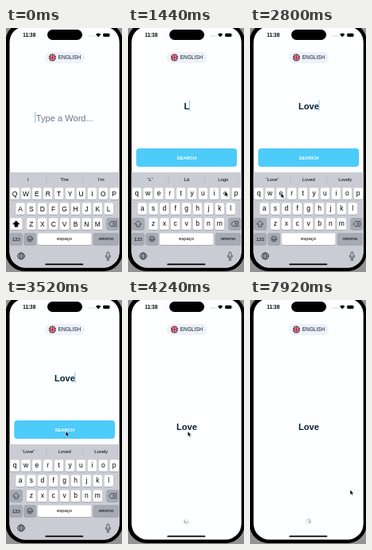
An HTML page that plays this animation: 146x306 px, repeating every 8 s.

```html
<!DOCTYPE html>
<html lang="en">
<head>
<meta charset="utf-8">
<title>Word search</title>
<style>
  html, body { margin: 0; width: 100%; height: 100%; overflow: hidden; background: #939394; }
  svg { display: block; width: 146px; height: 306px; }
  text { font-family: "Liberation Sans", Arial, sans-serif; text-anchor: middle; fill: #000; }
  .word { font-size: 11.1px; font-weight: 700; fill: #03202f; }
  .hint { font-size: 11.1px; fill: #6c7782; }
  .small { font-size: 5.9px; }
  .letter { font-size: 8.5px; }
  .line { fill: none; stroke: #24272c; stroke-width: .7; stroke-linecap: round; stroke-linejoin: round; }
</style>
</head>
<body>
<svg viewBox="0 0 146 306">
  <defs>
    <clipPath id="screen"><rect x="4.5" y="-2" width="138.2" height="302.4" rx="19.8"/></clipPath>
    <clipPath id="disc"><circle cx="58.4" cy="37" r="4.5"/></clipPath>
  </defs>
  <rect x="-.6" y="-7" width="147.4" height="312" rx="24" fill="#000"/>
  <g clip-path="url(#screen)">
    <rect width="146" height="306" fill="#fdfeff"/>

    <text x="29.2" y="11.2" font-size="6.4" font-weight="700">11:38</text>
    <rect x="52" y="2" width="44" height="13" rx="6.5" fill="#000"/>
    <g fill="#a9abae">
      <circle cx="104.5" cy="10" r=".6"/><circle cx="106.6" cy="10" r=".6"/>
      <circle cx="108.7" cy="10" r=".6"/><circle cx="110.8" cy="10" r=".6"/>
    </g>
    <path d="M113 8.1Q116.2 4.9 119.4 8.1L116.2 11.4Z" fill="#000"/>
    <rect x="122.2" y="6.7" width="8.2" height="4.4" rx="1.3" fill="#000"/>
    <rect x="130.7" y="8.1" width=".6" height="1.6" fill="#777"/>

    <rect x="48.7" y="30" width="50.6" height="14.2" rx="7.1" fill="#eef2f8"/>
    <g clip-path="url(#disc)" fill="none">
      <rect x="53" y="32" width="11" height="10" fill="#141a42"/>
      <path d="M53 32L63.8 42M63.8 32L53 42" stroke="#e8e8ee" stroke-width="1.1"/>
      <path d="M53 32L63.8 42M63.8 32L53 42" stroke="#b81c2b" stroke-width=".6"/>
      <path d="M58.4 32V42M53 37H64" stroke="#fff" stroke-width="2.2"/>
      <path d="M58.4 32V42M53 37H64" stroke="#c81d2d" stroke-width="1.4"/>
    </g>
    <text x="80" y="39.3" font-size="6.5" style="fill:#0b1d30">ENGLISH</text>

    <text id="word" x="73.9" class="word"></text>
    <text id="hint" x="73.8" y="116.6" class="hint">Type a Word...</text>
    <rect id="caret" width=".9" height="13.5" fill="#7ab5e2"/>

    <g id="button">
      <rect x="10.3" y="151" width="126.8" height="23" rx="4" fill="#4dcbf9"/>
      <text x="73.9" y="164.7" class="small" font-weight="700" style="fill:#fff">SEARCH</text>
    </g>
    <g id="spinner"></g>
    <g id="keyboard"></g>
    <rect x="49.3" y="295.6" width="48" height="1.7" rx=".85" fill="#000"/>
  </g>
  <path id="pointer" d="M0 0V6.2L1.5 4.9L2.5 7.1L3.6 6.6L2.7 4.5H4.6Z" fill="#000" stroke="#fff" stroke-width=".5"/>
</svg>

<script>
const LOOP = 8000, STEP = 80;
const $ = id => document.getElementById(id);
const show = (el, on) => el.setAttribute('visibility', on ? 'visible' : 'hidden');
const move = (el, x, y) => el.setAttribute('transform', `translate(${x} ${y})`);
const clamp = v => Math.max(0, Math.min(1, v));

// Keyboard geometry
const ROWS = ['qwertyuiop', 'asdfghjkl', 'zxcvbnm'];
const PITCH = 13.9, KEY_W = 11.6, KEY_H = 14.9;
const rowTop = r => 200.2 + r * 19;
const GREY = '#a5aab4', WHITE = '#fff';

const label = (x, y, s, cls) => `<text x="${x}" y="${y}" class="${cls}">${s}</text>`;
const box = (x, y, w, fill) =>
  `<rect x="${x}" y="${y + .4}" width="${w}" height="${KEY_H}" rx="1.8" fill="#888b90"/>` +
  `<rect x="${x}" y="${y}" width="${w}" height="${KEY_H}" rx="1.8" fill="${fill}"/>`;
const icon = (d, more = '') => `<path class="line" d="${d}" ${more}/>`;

const keys = {};
ROWS.forEach((row, r) => [...row].forEach((ch, i) => {
  keys[ch] = { x: 73.6 + (i - (row.length - 1) / 2) * PITCH, y: rowTop(r) };
}));

function letters(upper) {
  return Object.entries(keys).map(([ch, k]) =>
    box(k.x - KEY_W / 2, k.y, KEY_W, WHITE) +
    label(k.x, k.y + (upper ? 10.4 : 9.8), upper ? ch.toUpperCase() : ch, 'letter')).join('');
}

function specials(upper) {
  const y = rowTop(2), b = rowTop(3);
  return box(5.3, y, 15.2, upper ? WHITE : GREY) +
    icon(`M12.9 ${y + 3.8}l4 4h-2.1v3.2h-3.8v-3.2h-2.1z`, upper ? 'style="fill:#000;stroke:#000"' : '') +
    box(126.6, y, 15.2, GREY) +
    icon(`M130 ${y + 7.4}l2.7-3h6v6h-6zM134.5 ${y + 6.1}l2.4 2.6m0-2.6l-2.4 2.6`) +
    box(5.3, b, 15.2, GREY) + label(12.8, b + 9.5, '123', 'small') +
    box(22.6, b, 15.2, GREY) +
    `<circle class="line" cx="30.2" cy="${b + 7.3}" r="3.4"/>` +
    icon(`M28.3 ${b + 8.2}q1.9 2.3 3.8 0zM28.9 ${b + 6.1}v.2m2.6-.2v.2`) +
    box(39.9, b, 67.6, WHITE) + label(73.6, b + 9.2, 'espaço', 'small') +
    box(109.8, b, 32, GREY) + label(125.9, b + 9.2, 'retorno', 'small') +
    `<circle class="line" cx="19.1" cy="286" r="4.3"/><ellipse class="line" cx="19.1" cy="286" rx="1.9" ry="4.3"/>` +
    icon('M14.8 286h8.6M15.6 283.6h7M15.6 288.4h7') +
    `<rect class="line" x="126.8" y="281" width="3.2" height="6.2" rx="1.6"/>` +
    icon('M125.2 285.4q0 3.6 3.2 3.6t3.2-3.6M128.4 289v2M126.8 291h3.2');
}

const plate = '<rect x="0" y="181" width="146" height="126" fill="#c9ccd3"/>';
$('keyboard').innerHTML = plate + '<g id="bar"></g>' +
  [true, false].map(u => `<g id="${u ? 'upper' : 'lower'}">${letters(u)}${specials(u)}</g>`).join('') +
  '<g id="bubble"></g>';

function bubble(ch, upper) {
  if (!ch) return '';
  const { x, y } = keys[ch], h = KEY_W / 2, w = 10.4;
  return `<path fill="#fff" stroke="#b4b7bc" stroke-width=".3" d="M${x - w} ${y - 20}q0-3.4 3.4-3.4h${2 * w - 6.8}q3.4 0 3.4 3.4v12.4` +
    `q0 3-2.4 4.8q-2.2 1.6-2.2 4.2V${y + 13}q0 1.9-1.9 1.9H${x - h + 1.9}q-1.9 0-1.9-1.9V${y + 1.4}q0-2.6-2.2-4.2q-2.4-1.8-2.4-4.8z"/>` +
    `<text x="${x}" y="${y - 7.8}" font-size="13.2">${upper ? ch.toUpperCase() : ch}</text>`;
}

// Start time, typed word, three suggestions, highlighted middle
const GUESS = ['“Lo”', 'Li', 'Love'];
const TYPED = [
  [-400, '', ['I', 'The', "I'm"]],
  [1040, 'L', ['“L”', 'Lá', 'Logo']],
  [1600, 'Lo', GUESS, true],
  [2240, 'Lov', GUESS, true],
  [2720, 'Love', ['“Love”', 'Loved', 'Lovely']]
];
const PRESSES = [['l', 880, 1040], ['o', 1520, 1680], ['v', 2160, 2320], ['e', 2640, 2800]];
const PRESS = 3680, SEND = 3760, SLIDE = 320;

// Time, x, y of the pointer tip
const PATH = [
  [400, 138, 296], [800, 128, 227], [1040, 128, 227], [1360, 122, 205], [1600, 122, 205],
  [2080, 71.8, 247.8], [2320, 71.8, 247.8], [2600, 39, 207], [2800, 39, 207],
  [3440, 75.2, 164.8], [6640, 75.2, 164.8], [7520, 126, 238]
];

function pointerAt(t) {
  const i = PATH.findIndex(p => p[0] > t);
  if (i < 0) return PATH[PATH.length - 1].slice(1);
  const a = PATH[i - 1], b = PATH[i], u = (t - a[0]) / (b[0] - a[0]), e = u * u * (3 - 2 * u);
  return [a[1] + (b[1] - a[1]) * e, a[2] + (b[2] - a[2]) * e];
}

function suggestions(list, lit) {
  const mark = lit
    ? '<rect x="51.2" y="183" width="45" height="14" rx="2" fill="#e6e8ec"/>'
    : '<path d="M50.9 185v10M96.3 185v10" stroke="#adb1b8" stroke-width=".6"/>';
  return mark + list.map((s, i) => label([27.8, 73.7, 119.8][i], 192, s, 'small')).join('');
}

const SPOKES = 8, TICK = 99, TICK_ZERO = 5663;
$('spinner').innerHTML = Array.from({ length: SPOKES }, (_, i) =>
  `<path d="M0-1.7V-3.2" stroke="#74777d" stroke-width=".95" stroke-linecap="round" transform="rotate(${i * 360 / SPOKES})"/>`).join('');
const spokes = [...$('spinner').children];

function spin(t) {
  const lead = Math.floor((t - TICK_ZERO) / TICK) - 3;
  spokes.forEach((s, i) => {
    const age = ((lead - i) % SPOKES + SPOKES) % SPOKES;
    s.setAttribute('opacity', Math.max(.25, .95 - age * .14));
  });
}

let shown = -1;
function render(t) {
  const [since, word, list, lit] = TYPED.filter(s => s[0] <= t).pop();
  const sent = t >= SEND, upper = !word;
  const slide = 1 - (1 - clamp((t - SEND) / SLIDE)) ** 3;
  const base = 102 + 61 * slide;

  $('word').textContent = word;
  $('word').setAttribute('y', base);
  show($('hint'), !word);

  const half = $('word').getComputedTextLength() / 2;
  const age = (t - since) % 800;
  move($('caret'), word ? 73.5 + half : 36.3, (word ? base : 116.6) - 11.3);
  $('caret').setAttribute('opacity', sent ? 0 : age < 480 ? 1 : age < 560 ? .5 : 0);

  show($('button'), word && !sent);
  $('button').setAttribute('opacity', t >= PRESS ? .6 : 1);
  show($('spinner'), sent);
  move($('spinner'), 73.5, 162.5 + 115 * slide);
  spin(t);

  move($('keyboard'), 0, 126 * slide);
  show($('keyboard'), slide < 1);
  if (slide < 1) {
    $('upper').style.display = upper ? '' : 'none';
    $('lower').style.display = upper ? 'none' : '';
    $('bar').innerHTML = suggestions(list, lit);
    const hit = PRESSES.find(p => t >= p[1] && t < p[2]);
    $('bubble').innerHTML = bubble(hit && hit[0], upper);
  }

  show($('pointer'), t >= PATH[0][0]);
  if (t >= PATH[0][0]) move($('pointer'), ...pointerAt(t));
}

const start = performance.now();
function loop() {
  const t = Math.floor((performance.now() - start) % LOOP / STEP) * STEP;
  if (t !== shown) render(shown = t);
  requestAnimationFrame(loop);
}
loop();
</script>
</body>
</html>
```
